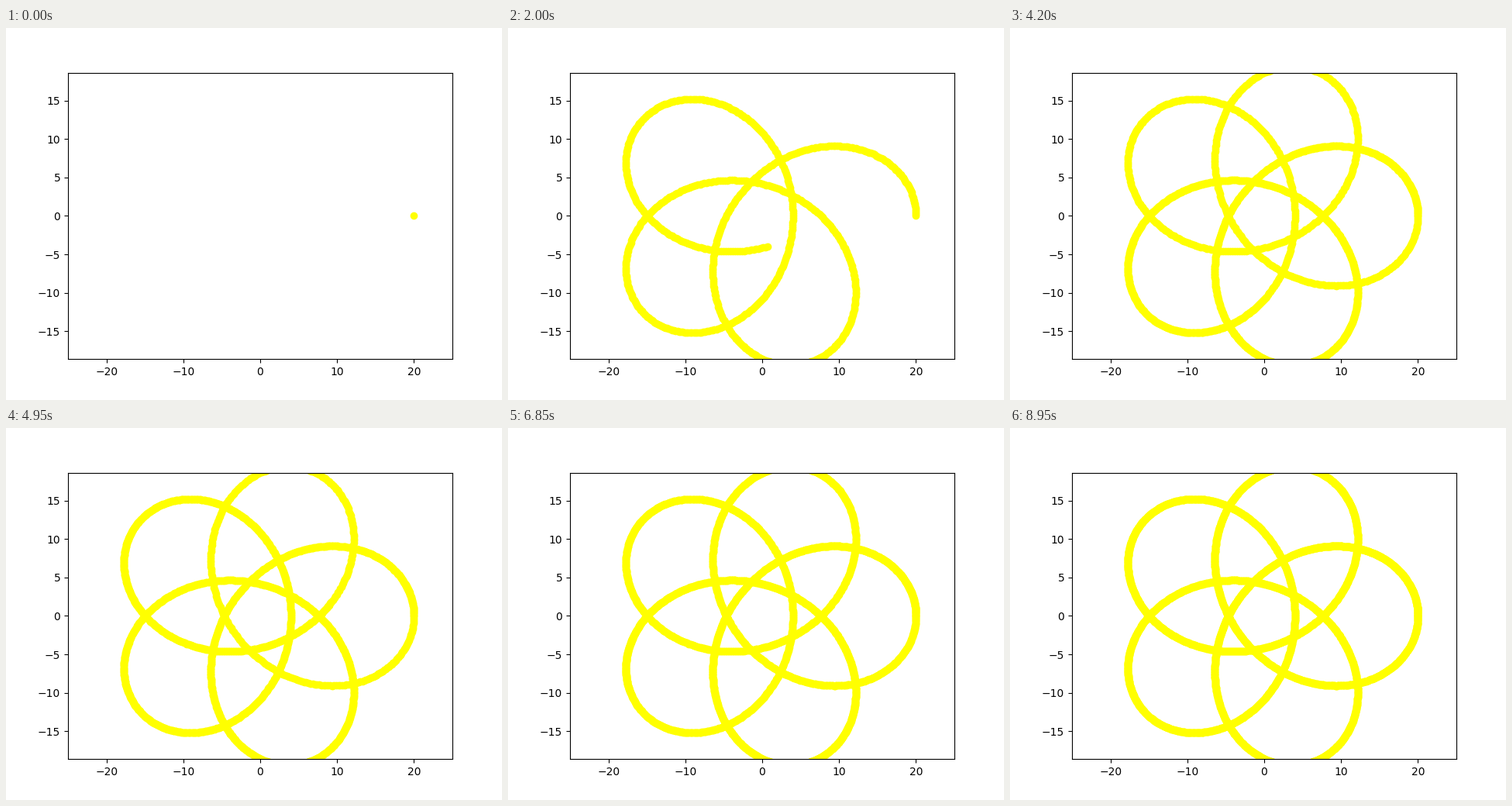
Write a matplotlib script that moves like this. It is 640 by 480 pixels and loops after 9000 ms.

```python
import numpy as np
import matplotlib.pyplot as plt
from matplotlib.animation import FuncAnimation

FRAMES = 180
INTERVAL = 50
DOTS = 20  # trail dots added per frame

# Five-lobed trochoid: a circle of radius 12 plus a slower counter-turning one
t = np.linspace(0, 25 * np.pi, (FRAMES - 1) * DOTS + 1)
x = 12 * np.cos(t) + 8 * np.cos(t / 4)
y = 12 * np.sin(t) - 8 * np.sin(t / 4)

fig, ax = plt.subplots(figsize=(6.4, 4.8), dpi=100)
half_height = 25 * (0.77 * 4.8) / (0.775 * 6.4)
ax.set_xlim(-25, 25)
ax.set_ylim(-half_height, half_height)

trail, = ax.plot([], [], "o", color="yellow")


def draw(frame):
    end = frame * DOTS + 1
    trail.set_data(x[:end], y[:end])
    return trail,


anim = FuncAnimation(fig, draw, frames=FRAMES, interval=INTERVAL,
                     init_func=lambda: draw(0), repeat=True, repeat_delay=0)
plt.show()
```
